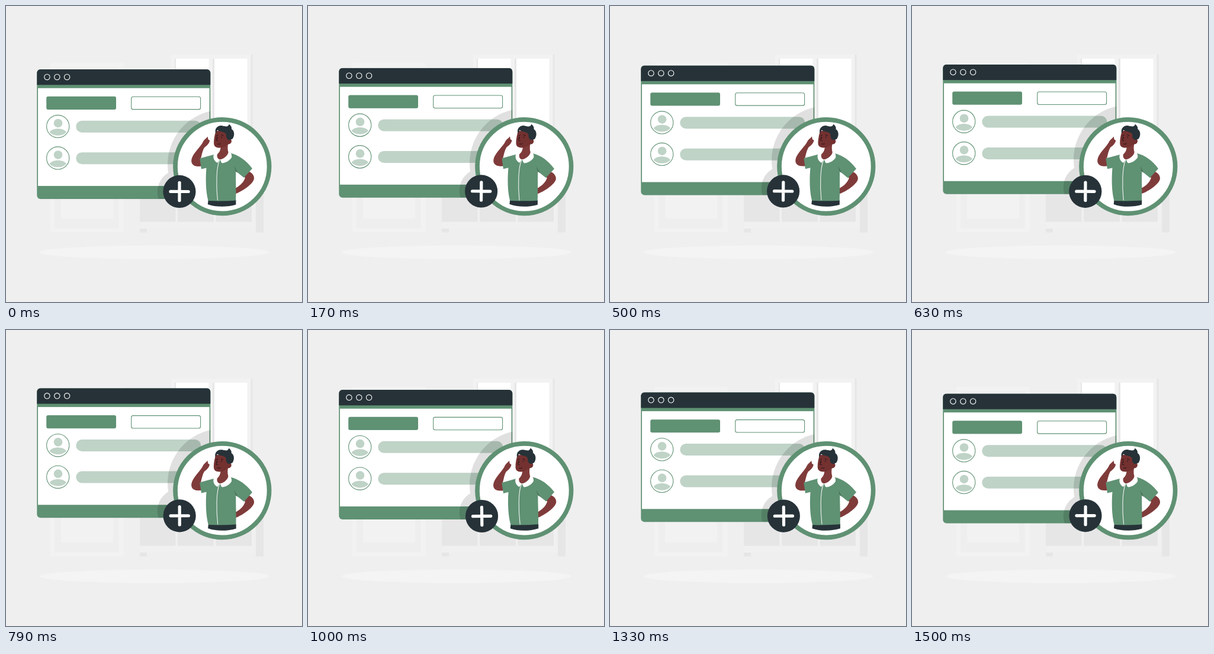
Animation, 500 px wide and 500 px high, one loop 1.54 s. Source, as an HTML page:

```html
<!DOCTYPE html>
<html lang="en">
<head>
<meta charset="utf-8">
<title>Add user</title>
<style>
  html, body { margin: 0; width: 100%; height: 100%; overflow: hidden; background: #efefef; }
  svg { display: block; width: 100%; height: 100%; }
  .green { fill: #5f9173; }
  .dark { fill: #263238; }
  .pale { fill: #bfd3c7; }
  .skin { fill: #7f3b3a; }
  .line { fill: #fff; stroke: #5f9173; stroke-width: 1.1; }
  .white-line { fill: none; stroke: #fff; stroke-linecap: round; }
</style>
</head>
<body>
<svg viewBox="0 0 500 500">
  <defs>
    <clipPath id="frame"><rect x="52.3" y="107" width="293" height="219" rx="6"/></clipPath>
    <g id="row">
      <circle class="line" cx="87.7" cy="203.5" r="19.1"/>
      <circle class="pale" cx="88" cy="198" r="7.3"/>
      <path class="pale" d="M73.5 213.2C78 205.2 97.500 205.200 102 213.200C95 220.800 80.500 220.800 73.500 213.200Z"/>
      <rect class="pale" x="118.300" y="193.700" width="211" height="20" rx="10"/>
    </g>
  </defs>

  <g id="room">
    <rect x="75" y="96" width="124" height="286.500" fill="#f2f2f2"/>
    <rect x="82" y="104" width="108.500" height="271.500" fill="#eeeeee"/>
    <rect x="93" y="115" width="88" height="244" fill="#f2f2f2"/>
    <rect x="408" y="82" width="8.500" height="130" fill="#e6e6e6"/>
    <rect x="278.500" y="82" width="135" height="294" fill="#f2f2f2"/>
    <path d="M285 89H287V240H285ZM349 89H352V240H349Z" fill="#e6e6e6"/>
    <path d="M287 89H342.500V240H287ZM352 89H407.500V240H352Z" fill="#fff"/>
    <rect x="226" y="300" width="209" height="76" fill="#f0f0f0"/>
    <path d="M226 300H286.500V364.500H226ZM290 300H351V364.500H290ZM354.500 300H415V364.500H354.500ZM422 300H435V382.500H422ZM226 376H238V382.500H226Z" fill="#e6e6e6"/>
    <ellipse cx="251" cy="416" rx="194" ry="11.500" fill="#f4f4f4"/>
  </g>

  <g id="panel">
    <g clip-path="url(#frame)">
      <rect class="green" x="52" y="107" width="294" height="220"/>
      <rect class="dark" x="52" y="107" width="294" height="26.300"/>
      <rect x="54" y="138.800" width="289.600" height="165.200" fill="#fff"/>
      <g class="white-line" stroke-width="1.1">
        <circle cx="69.400" cy="120" r="4.700"/>
        <circle cx="86.300" cy="120" r="4.700"/>
        <circle cx="103.100" cy="120" r="4.700"/>
      </g>
      <rect class="green" x="68.200" y="152.800" width="117.800" height="22.200" rx="3"/>
      <rect class="line" x="211.700" y="153.300" width="116.900" height="21.400" rx="3"/>
      <use href="#row"/>
      <use href="#row" y="53.500"/>
      <g opacity=".12">
        <circle cx="365" cy="267.500" r="92"/>
        <circle cx="293" cy="314" r="37.300"/>
      </g>
    </g>
  </g>

  <g id="badge">
    <circle cx="365.300" cy="271.100" r="79.300" fill="#fff" stroke="#5f9173" stroke-width="7.700"/>
    <g id="person">
      <path class="skin" d="M340.500 220.500C338 224 334 226 332.500 230C329 237 318 247 314.300 256C310.500 266 316 273 331 270.500L329 258C331 250 332 244 335 239C340 235.500 344 231 344 227L341.500 225.500Z"/>
      <path class="skin" d="M405 278C413 279 420 285 419 292C417 301 401 311.500 391 316L382 319L377 314.500L379 308.800L389 307C396 303 402 297 404 290L399 286Z"/>
      <path class="dark" d="M341.700 327.500L388.500 327.500V335.500C374 340 354 340 341 335Z"/>
      <path class="green" d="M351 251C343 253 335 255.500 327.300 257.500L330 275.500L338.500 273.500C337 292 337.500 314 341.700 329Q364 330 388.300 328.500C389 312 388 296 388.300 279L402 290L416 274.500C407 262 394 252 379 248.500Z"/>
      <path d="M385.500 270.500L391.500 282L388.200 279.200Z" fill="#3f6a52"/>
      <path d="M351 250.500L360 246L376 245.500C380 247 382 252 381 256C376 263 370 265 365 265.500L361.500 259.500L357 265C352 262 349 257 351 250.500Z" fill="#fff"/>
      <path class="skin" d="M362.500 235C363 242 361 247 356.800 250.500C355.500 256 359 260 363 259C369 257.500 375 252 375.500 247C374 242 374 236 376 230Z"/>
      <path d="M354.500 211C352 219 350.500 228 351.300 234C352.500 239.500 360 240.500 366 238.500C371 237 374 233 376 233.500C381 233 382.500 227 379 224.500L377 211Z" fill="#733130"/>
      <path class="dark" d="M354 215C351.500 207 358 201 365 202.300C369 203.300 373 204 374 203C376 202 376.500 200.500 376.500 199.500C380 202 381.500 205 381 208C386 211 386.500 219 382.500 224.500L378.500 226C374 227 371.500 223 371.800 217C370.500 212 361 213 357 209.500Z"/>
      <path d="M355 219.500L358 218M363.500 217.500L367 219M356.500 221L355 227L358 227.500M357 233Q360 234 362 232.500" fill="none" stroke="#32191b" stroke-width="1" stroke-linecap="round"/>
      <path d="M356.300 222h1.200v2h-1.200zM363.500 220.500h1.200v2h-1.200z" fill="#211719"/>
      <path class="white-line" stroke-width="1" d="M360.500 261C355 273 355 304 357.500 328M363 260L364 264"/>
    </g>
    <circle class="dark" cx="293" cy="313.600" r="27.600"/>
    <path class="white-line" stroke-width="5.200" d="M278 313.600H308.200M293.100 298.500V328.700"/>
  </g>
</svg>
<script>
  const LOOP = 1540, CYCLE = 1500, LIFT = 10, SWAY = 1;
  const panel = document.getElementById('panel');
  const badge = document.getElementById('badge');

  // Straight segments: 0 to 1 and back to 0 over one cycle.
  const rise = p => 1 - Math.abs(1 - 2 * p);
  // Straight segments: 0, 1, -1, 0, with turns at the quarters.
  const swing = p => p < .25 ? 4 * p : p < .75 ? 2 - 4 * p : 4 * p - 4;

  function draw() {
    const t = performance.now() % LOOP;
    const p = ((40 + t * .975) % CYCLE) / CYCLE;
    panel.setAttribute('transform', `translate(0 ${.5 - LIFT * rise(p)})`);
    badge.setAttribute('transform', `rotate(${SWAY * swing(p)} 365.3 271.1)`);
    requestAnimationFrame(draw);
  }
  draw();
</script>
</body>
</html>
```
